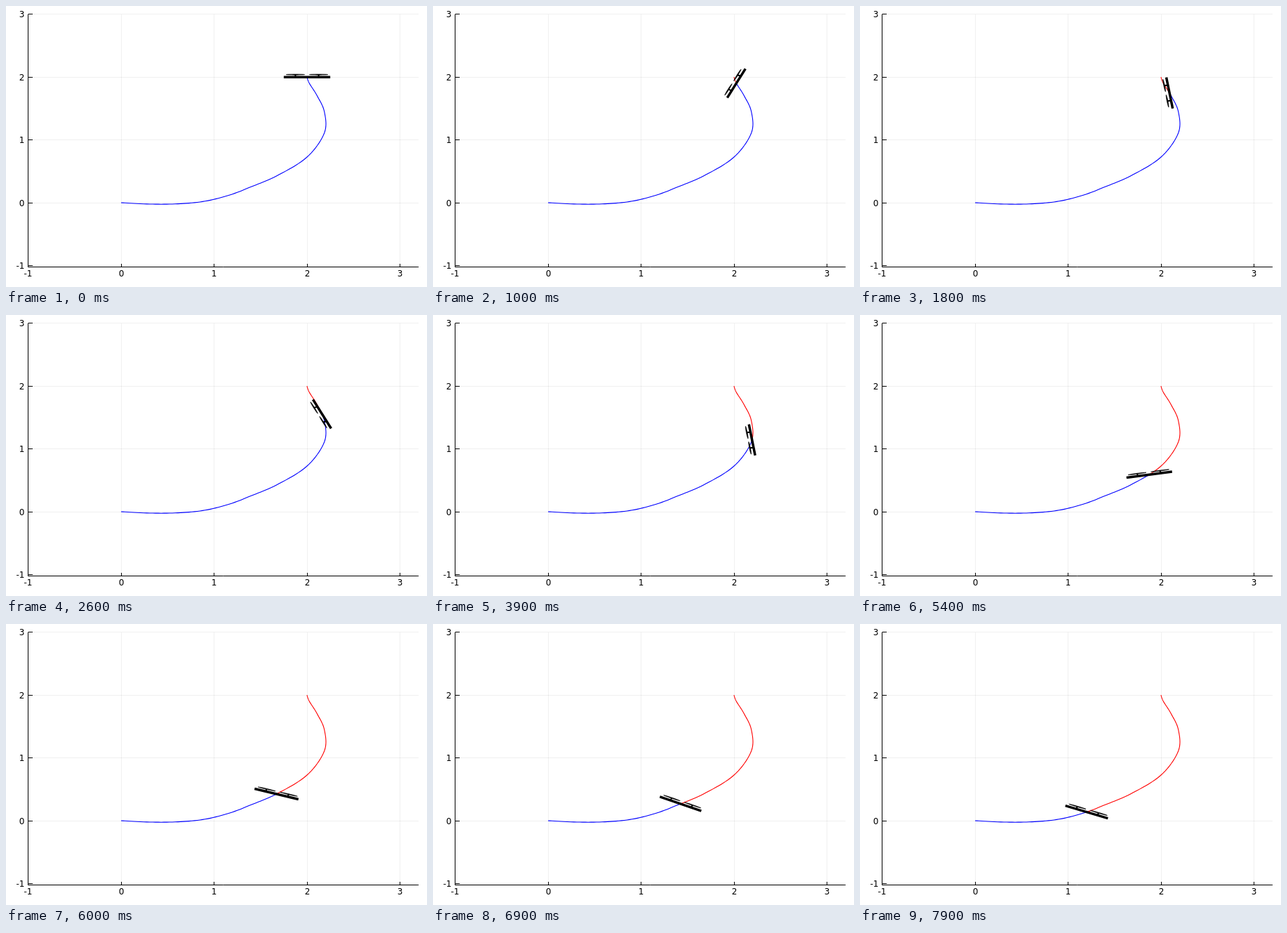
An HTML page with a canvas that plays this animation: 600x400 px, repeating every 8000 ms.

```html
<!DOCTYPE html>
<html lang="en">
<head>
<meta charset="utf-8">
<style>
html, body { margin: 0; width: 600px; height: 400px; overflow: hidden; background: #fff; }
canvas { display: block; }
</style>
</head>
<body>
<canvas id="stage" width="600" height="400"></canvas>
<script>
const ctx = document.getElementById('stage').getContext('2d');
const SX = 132.5, SY = 89.4;          // pixels per unit
const px = x => Math.floor(164 + SX * x) + 0.5;
const py = y => Math.floor(280 - SY * y) + 0.5;

// One key point per second: centre x, centre y (px), tilt (degrees)
const keys = [
  [429, 101.2, 0], [432.3, 110, 67], [443.4, 127.8, 103], [453.8, 150.9, 114],
  [453.6, 181, 94], [428.5, 215.5, 35.5], [385.5, 242, -19.4], [349.5, 257.3, -27],
  [319.8, 268.7, -22.5], [284, 277.8, 0], [245, 281.6, 0], [205, 282, 0], [164, 280, 0]
];
const last = keys.length - 1;

// Smooth curve through the keys, starting at rest
function pose(t) {
  const i = Math.min(Math.floor(t), last - 1), u = t - i;
  const [a, b, c, d] = [-1, 0, 1, 2].map(k => keys[Math.min(Math.abs(i + k), last)]);
  return b.map((p, k) => p + u / 2 * (c[k] - a[k] +
    u * (2 * a[k] - 5 * p + 4 * c[k] - d[k] + u * (3 * (p - c[k]) + d[k] - a[k]))));
}

const path = Array.from({ length: last * 10 + 1 }, (_, i) => pose(i / 10));

function line(points, color, width) {
  ctx.beginPath();
  points.forEach(([x, y]) => ctx.lineTo(x, y));
  ctx.strokeStyle = color;
  ctx.lineWidth = width;
  ctx.stroke();
}

function label(text, x, y, align) {
  ctx.textAlign = align;
  ctx.fillText(text, x, y);
}

function axes() {
  const grid = 'rgba(0,0,0,.06)';
  ctx.fillStyle = '#000';
  ctx.font = '12px "DejaVu Sans", sans-serif';
  for (let v = -1; v <= 3; v++) {
    const x = px(v), y = py(v);
    line([[x, 12], [x, 371]], grid, 1);
    line([[32, y], [588, y]], grid, 1);
    line([[x, 371.5], [x, 367]], '#000', 1);
    line([[31.5, y], [38, y]], '#000', 1);
    label(v, x, 385, 'center');
    label(v, 26.5, y + 4, 'right');
  }
  line([[31.5, 12], [31.5, 371.5], [588, 371.5]], '#000', 1);
}

function drone([x, y, tilt]) {
  const c = Math.cos(tilt * Math.PI / 180), s = Math.sin(tilt * Math.PI / 180);
  const at = (along, up) => [x + SX * (along * c - up * s), y - SY * (along * s + up * c)];
  line([at(-0.25, 0), at(0.25, 0)], '#000', 3.5);
  for (const m of [-0.125, 0.125]) {
    line([at(m, 0), at(m, 0.04)], '#000', 2);
    const blade = Array.from({ length: 33 }, (_, i) => {
      const a = i * Math.PI / 16;
      return at(m + 0.1 * Math.cos(a), 0.04 + 0.006 * Math.sin(a));
    });
    line(blade, '#000', 0.6);
    ctx.fill();
  }
}

function draw(now) {
  const n = Math.floor(now % 8000 / 100);
  ctx.fillStyle = '#fff';
  ctx.fillRect(0, 0, 600, 400);
  axes();
  line(path.slice(n), '#00f', 1.1);
  line(path.slice(0, n + 1), '#f00', 1.1);
  drone(path[n]);
}

let start;
function tick(now) {
  start ??= now;
  draw(now - start);
  requestAnimationFrame(tick);
}
draw(0);
requestAnimationFrame(tick);
</script>
</body>
</html>
```
